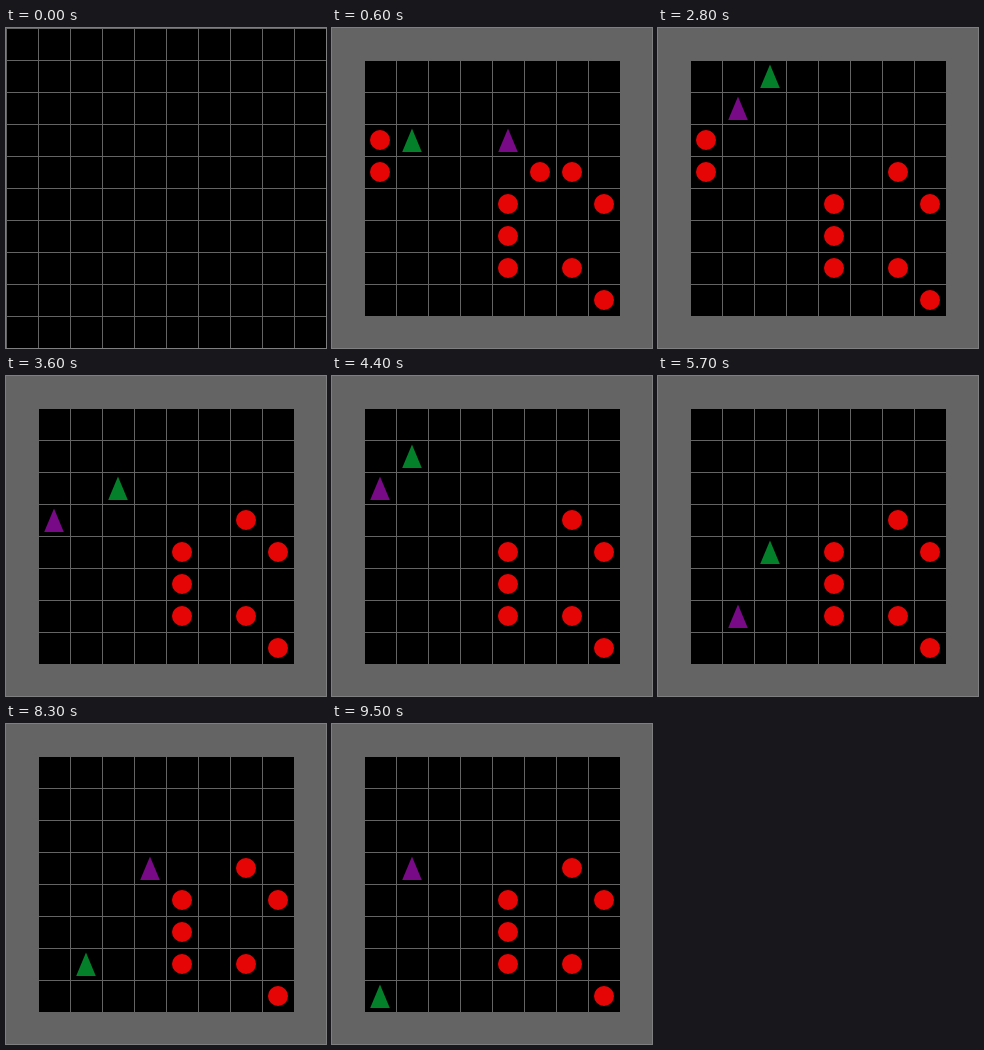
Animation, 320 px wide and 320 px high, one loop 9.6 s. Source, as an HTML page with a canvas:

```html
<!DOCTYPE html>
<html lang="en">
<head>
<meta charset="utf-8">
<title>Grid world</title>
<style>
  html, body { margin: 0; width: 100%; height: 100%; overflow: hidden; background: #000; }
  canvas { display: block; }
</style>
</head>
<body>
<canvas id="stage" width="320" height="320"></canvas>
<script>
const CELL = 32, CELLS = 10, STEP = 100, STEPS = 96;
const GREY = '#646464', RED = '#e60505';
const ctx = document.getElementById('stage').getContext('2d');

// One letter per step; a move into the wall leaves the agent where it is.
const agents = [
  { color: '#05802a', x: 1, y: 1, moves:
    'RRDDLULUL DRURD RRDRD LULULURL DU LLDRDRULDU DDUU DDLLDR UURDDLR DLL ' +
    'RLDURDULRL U DURDLDLDU DRULDDRRLU DLLUD' },
  { color: '#780a87', x: 4, y: 1, moves:
    'RDLDRULUURDLDU UULDLDRULUDDU DU DDLUDLUUDD UDLU DDDDRU LDDRUDU DLL ' +
    'RDUDLLUDRLD DRURUDLUU RURDLDRUUD LRULL' }
];
const balls = [[1, 3], [1, 4], [6, 4], [7, 4], [5, 5], [8, 5], [5, 6], [5, 7], [7, 7], [8, 8]]
  .map(([x, y]) => ({ x, y, eaten: Infinity }));

const DIRS = { L: [-1, 0], R: [1, 0], U: [0, -1], D: [0, 1] };
const inside = v => Math.min(CELLS - 2, Math.max(1, v));

function walk({ x, y, moves }) {
  const path = [null, [x, y]];
  for (const m of moves.replace(/ /g, '')) {
    x = inside(x + DIRS[m][0]);
    y = inside(y + DIRS[m][1]);
    path.push([x, y]);
  }
  return path;
}

for (const agent of agents) {
  agent.path = walk(agent);
  for (const ball of balls) {
    const hit = agent.path.findIndex(p => p && p[0] === ball.x && p[1] === ball.y);
    if (hit > 0) ball.eaten = Math.min(ball.eaten, hit);
  }
}

function drawGrid() {
  const size = CELL * CELLS;
  ctx.fillStyle = '#000';
  ctx.fillRect(0, 0, size, size);
  ctx.fillStyle = GREY;
  for (let p = 0; p < size; p += CELL) {
    ctx.fillRect(p, 0, 1, size);
    ctx.fillRect(0, p, size, 1);
  }
}

function drawWalls() {
  const size = CELL * CELLS, far = size - CELL;
  ctx.fillStyle = GREY;
  ctx.fillRect(0, 0, size, CELL);
  ctx.fillRect(0, far, size, CELL);
  ctx.fillRect(0, 0, CELL, size);
  ctx.fillRect(far, 0, CELL, size);
}

function drawBall({ x, y }) {
  ctx.fillStyle = RED;
  ctx.beginPath();
  ctx.arc((x + 0.5) * CELL, (y + 0.5) * CELL, 10, 0, Math.PI * 2);
  ctx.fill();
}

function drawAgent(color, [x, y]) {
  const left = x * CELL, top = y * CELL;
  ctx.fillStyle = color;
  ctx.beginPath();
  ctx.moveTo(left + 16, top + 4.5);
  ctx.lineTo(left + 25.8, top + 28);
  ctx.lineTo(left + 6.2, top + 28);
  ctx.fill();
}

function frame() {
  const step = Math.floor(performance.now() / STEP) % STEPS;
  drawGrid();
  if (step > 0) {
    drawWalls();
    balls.filter(b => step < b.eaten).forEach(drawBall);
    agents.forEach(a => drawAgent(a.color, a.path[step]));
  }
  requestAnimationFrame(frame);
}
frame();
</script>
</body>
</html>
```
